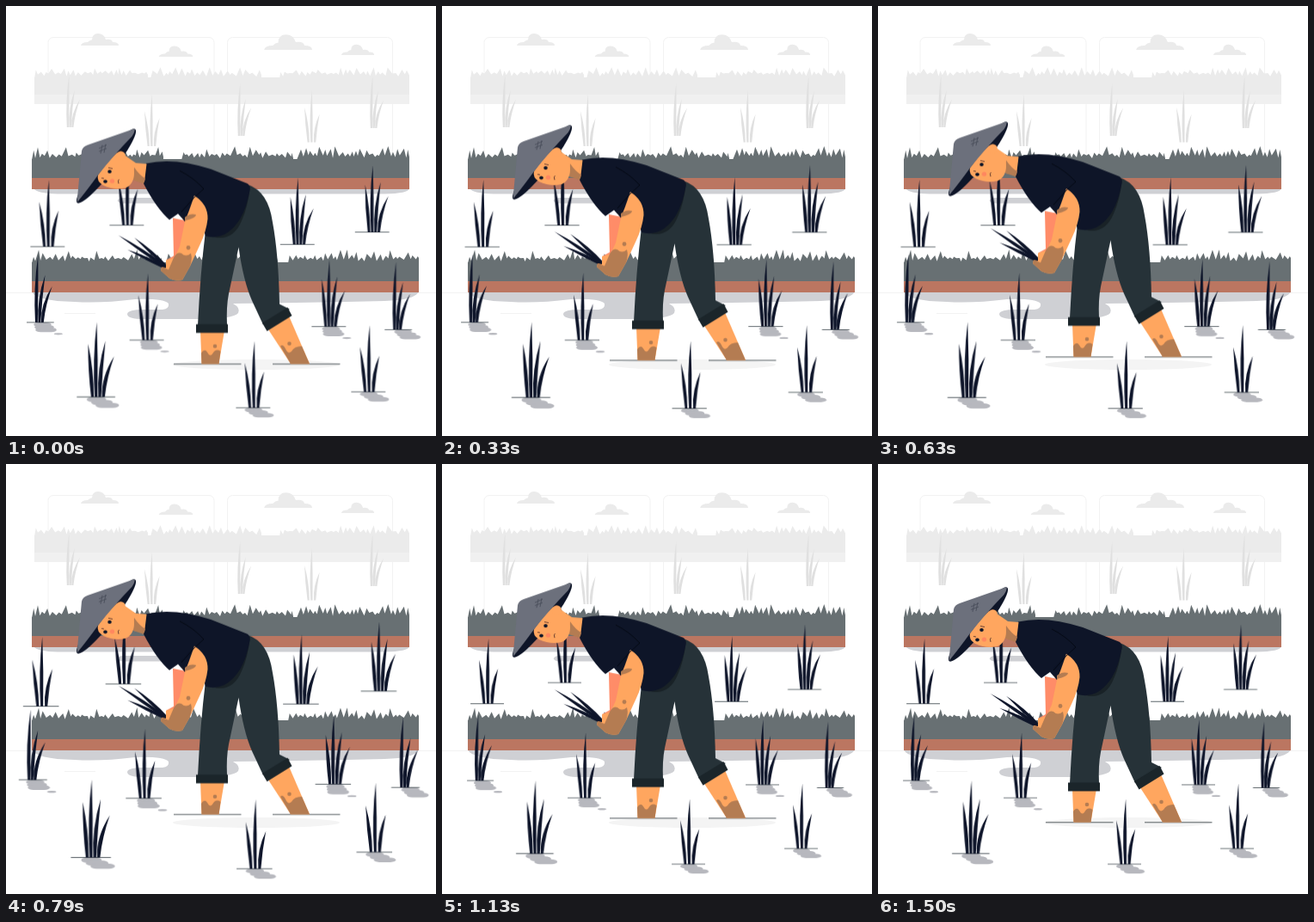
Recreate the animation shown at these times as an HTML page. Size 500 by 500 pixels, loop 1.54 s.

```html
<!DOCTYPE html>
<html lang="en">
<head>
<meta charset="utf-8">
<title>Rice field</title>
<style>
  html, body { margin: 0; width: 100%; height: 100%; overflow: hidden; background: #fff; }
  svg { display: block; width: 100vw; height: 100vh; }
  .pulse { animation: pulse 1540ms linear -34ms infinite; }
  #far { transform-origin: 237px 232px; }
  #near { transform-origin: 250px 383px; }
  #man { animation: bob 1540ms linear -34ms infinite; }
  @keyframes pulse {
    0%, 30%, 40%, 60%, 100% { transform: scale(1); }
    10%, 50% { transform: scale(1.1); }
  }
  @keyframes bob {
    0%, 100% { transform: translateY(0); }
    50% { transform: translateY(-10px); }
  }
</style>
</head>
<body>
<svg viewBox="0 0 500 500" xmlns="http://www.w3.org/2000/svg">
  <g fill="none" stroke="#f2f2f2">
    <rect x="49" y="36.500" width="193" height="150" rx="6"/>
    <rect x="257.500" y="36.500" width="192" height="150" rx="6"/>
    <path d="M0 333.500H500M68 357.500H104"/>
  </g>
  <g id="clouds" fill="#ebebeb"></g>
  <g fill="#cfd0d4">
    <path d="M32 212H469Q468 218 440 218.500H60Q36 218 32 212Z"/>
    <rect x="130" y="223" width="76" height="6.500" rx="6" ry="3.200"/>
    <path d="M30 332H480Q476 342 440 343Q350 345 264 346Q273 351 270 357Q264 364 225 364H160Q141 364 141 358Q142 353 160 353H182Q190 352 189 346Q184 340 150 341Q110 346 80 344Q34 343 30 332Z"/>
  </g>
  <g id="strips"></g>
  <g id="far" class="pulse"></g>
  <ellipse cx="291" cy="417" rx="97" ry="6" fill="#f4f4f4"/>

  <g id="man">
    <path d="M195 416.800H273.500M310 416.800H388.500" stroke="#263238" stroke-width=".8"/>
    <g fill="#ffa65f">
      <path d="M226 378H254L247.500 416.500H227.500Z"/>
      <path d="M304 375L329 361L353 416.500H331Z"/>
    </g>
    <g fill="#b47c52">
      <path d="M227 404Q231 398 234 403Q237 409 240 405Q244 398 249.500 402L247.500 416.500H227.500Z"/>
      <path d="M319 396Q322 393 325 399Q328 406 332 402Q335 396 344 396L353 416.500H331Z"/>
      <circle cx="243" cy="396" r="2.300"/><circle cx="329.500" cy="393" r="2.300"/>
    </g>
    <path d="M232 262Q226 310 223 372H257Q256 350 259 335L270.500 281Q276 320 286 343L299 371L330 353L318 347Q317 290 310 252Q305 216 281 208Z" fill="#263238"/>
    <path d="M221 370.500H258V380.500H221Z M298 369L327.500 351L332.500 360.500L303.500 378.500Z" fill="#1b252a"/>
    <path d="M232 266Q262 279 274 250Q281 235 284 210L270 215Z" fill="#192227"/>

    <path d="M194 247L209 250L204 279L196 296L186 300V296L195 291Z" fill="#ff8c68"/>
    <g id="sheaf" fill="#0e152a"></g>
    <path d="M163 183.500Q195 176 238 190L281 207Q285 210 283 217Q276 254 254 266Q244 271 232 268L219 221L208 251L200 242L190 249Q175 236 160 207Z" fill="#0e1528"/>
    <path d="M219 221Q235 231 234.500 248Q233 262 226 277L214 303L205 319Q197 321 190 317L180 308L181 304L186 305V296L196 293L202 280L208 251L204 246Z" fill="#ffa65f"/>
    <path d="M219 221L204 239V246L208 251L213 238Z" fill="#0e1528"/>
    <path d="M208 246Q214 241 221 243Q221 247 208 250Z" fill="#b47c52"/>
    <path d="M195 293Q199 286 204 288Q209 293 215 288Q217 295 214 303L205 319Q197 321 190 317L180 308L181 304L189 307Z" fill="#b47c52"/>
    <circle cx="212" cy="281.500" r="2.400" fill="#b47c52"/>
    <path d="M202 192Q218 200 230 213L219 223L204 240" fill="none" stroke="#050914" stroke-width=".9"/>

    <ellipse cx="116.500" cy="186.500" rx="54.500" ry="9.500" transform="rotate(-51.700 116.500 186.500)" fill="#0e1528"/>
    <path d="M138 174L151 183L163.500 184L161 205L149 203L140 198Z" fill="#ffa65f"/>
    <path d="M149 188Q155 197 162 201L160 207L148 203Z" fill="#b47c52"/>
    <path d="M129 171Q118 181 107 197Q105 204 113 209Q126 215 139 212Q149 208 149 193Q148 183 140 177Z" fill="#ffa65f"/>
    <circle cx="133.500" cy="174.500" r="5.300" fill="#ffa65f"/>
    <g fill="#0e1528">
      <ellipse cx="120.500" cy="193" rx="2.300" ry="2"/><ellipse cx="115.500" cy="204.500" rx="2.300" ry="1.900"/>
    </g>
    <circle cx="123.500" cy="204" r="2.600" fill="#ff875f"/>
    <path d="M131.500 202Q129.500 203 131 207M119 188.500L124 189.500M111 200.500L114 201" fill="none" stroke="#6b4030"/>
    <path d="M149.500 143L95 162Q89 164 88 169L82.500 229Q94 215 107 197Q126 173 146.500 152Q150.500 146 149.500 143Z" fill="#6c707c"/>
    <path d="M108 166L117 162M108 169.500L117 166M110 172L112 162M114 171L116 161" fill="none" stroke="#474c59" stroke-width=".8"/>
  </g>
  <g id="near" class="pulse"></g>
</svg>
<script>
const put = (id, html) => document.getElementById(id).insertAdjacentHTML('beforeend', html);

function random(seed) {
  return () => (seed = (seed * 16807) % 2147483647) / 2147483647;
}

// A leaf rises straight from its base and leans over towards the tip.
function blade(x, y, tx, ty, cx = x + (tx - x) * .15 - 1, w = 3) {
  const cy = (y + ty) / 2;
  return `M${x - 1.4} ${y}Q${cx - w} ${cy} ${tx} ${ty}Q${cx + w} ${cy} ${x + 1.4} ${y}Z`;
}

// Evenly fanned leaves; the bases sit closer together than the tips.
function fan(heights, first, step, root) {
  const mid = (heights.length - 1) / 2;
  return heights.map((h, i) =>
    blade(root + (i - mid) * step * .42, 0, first + i * step, -h)).join('');
}

const three = fan([51, 76, 41], 10, 11, 20.5);
const four = fan([54, 76, 57, 41], 11.5, 8.8, 21.5);
const side = fan([77, 54, 41], 13, 8, 14.5);

function pills(x, step, dot) {
  let out = dot ? `<ellipse cx="${x + 18}" cy="13" rx="5" ry="1.1"/>` : '';
  for (let i = 0; i < 3; i++)
    out += `<rect x="${x - 10 - i + step * i}" y="${3 * i}" width="${20 + 2 * i}" height="5" rx="6" ry="2.5"/>`;
  return out;
}

function plant(id, leaves, x, y, ripple = '', s = 1) {
  const width = leaves === side ? 31 : 39;
  put(id, `<g transform="translate(${x} ${y}) scale(${s})"><g fill="#b7b8be">${ripple}</g>` +
    `<path d="M0 0H${width}" stroke="#263238" stroke-width=".7"/><path d="${leaves}" fill="#0e152a"/></g>`);
}

function grass(a, b, base, tall, rnd) {
  let d = `M${a} ${base + 1}`;
  for (let x = a; x < b;) {
    const end = Math.min(x + 4 + rnd() * 4, b);
    const peak = x + (end - x) * (.3 + rnd() * .4);
    d += `L${peak} ${base - 5 - tall * rnd() ** 1.4}L${end} ${base - 1 - rnd() * 4}`;
    x = end;
  }
  return `${d}V${base + 1}Z`;
}

// Gaps between the runs leave the flat edge of the bank bare.
function strip(x, w, base, mid, end, tall, runs, top, soil, seed) {
  const rnd = random(seed);
  const tufts = runs.map(([a, b]) => grass(a, b, base, tall, rnd)).join('');
  put('strips', `<path d="${tufts}M${x} ${base}h${w}V${mid}h${-w}Z" fill="${top}"/>` +
    `<rect x="${x}" y="${mid}" width="${w}" height="${end - mid}" fill="${soil}"/>`);
}

for (const [x, y, s] of [[109, 46, 1], [197.5, 59, .9], [328, 51, 1.27], [409, 57, .87]])
  put('clouds', `<path transform="translate(${x} ${y}) scale(${s})" d="M-22 0Q-21 -4 -14 -4Q-11 -7 -9 -6.500Q-9 -14 -2 -14Q5 -14 7 -7Q14 -8 15 -4Q22 -4 22 0Z"/>`);

strip(33, 436, 83, 103, 114, 7, [[33, 165], [168, 297], [318, 469]], '#ebebeb', '#f0f0f0', 71);
strip(30, 439, 178, 200, 213, 10, [[30, 183], [204, 334], [338, 469]], '#687073', '#bb7661', 423);
strip(30, 450, 298, 320, 333, 10, [[30, 181], [186, 316], [328, 480]], '#687073', '#bb7661', 977);

for (const [leaves, x, y] of [[side, 63, 141], [three, 153, 163], [side, 262, 151], [three, 339, 158.5], [side, 416, 142]])
  put('strips', `<path d="${leaves}" transform="translate(${x} ${y}) scale(.8)" fill="#e0e0e0"/>`);

plant('far', three, 33, 278.7);
plant('far', three, 123, 254.3);
plant('far', four, 317, 276.2);
plant('far', four, 402, 262.2);

const drift = pills(20, 5.5);
const pool = pills(22, 1.5, true);
plant('near', side, 29, 368.2, pills(18, 2, true));
plant('near', three, 146, 388.3, pool);
plant('near', four, 353, 373, pool);
plant('near', side, 436, 376.5, pills(21, 4));
plant('near', four, 86, 453, drift, 1.12);
plant('near', three, 267, 465.3, drift);
plant('near', three, 398, 447.2, drift);

// Seedlings held in the hand, the middle one longest.
for (let i = -1; i <= 1; i++) {
  const len = 68 - 17 * Math.abs(i);
  put('sheaf', `<path d="${blade(0, 0, 0, -len, 1)}" transform="translate(187 ${305 - i}) rotate(${-56 + i * 8})"/>`);
}
</script>
</body>
</html>
```
